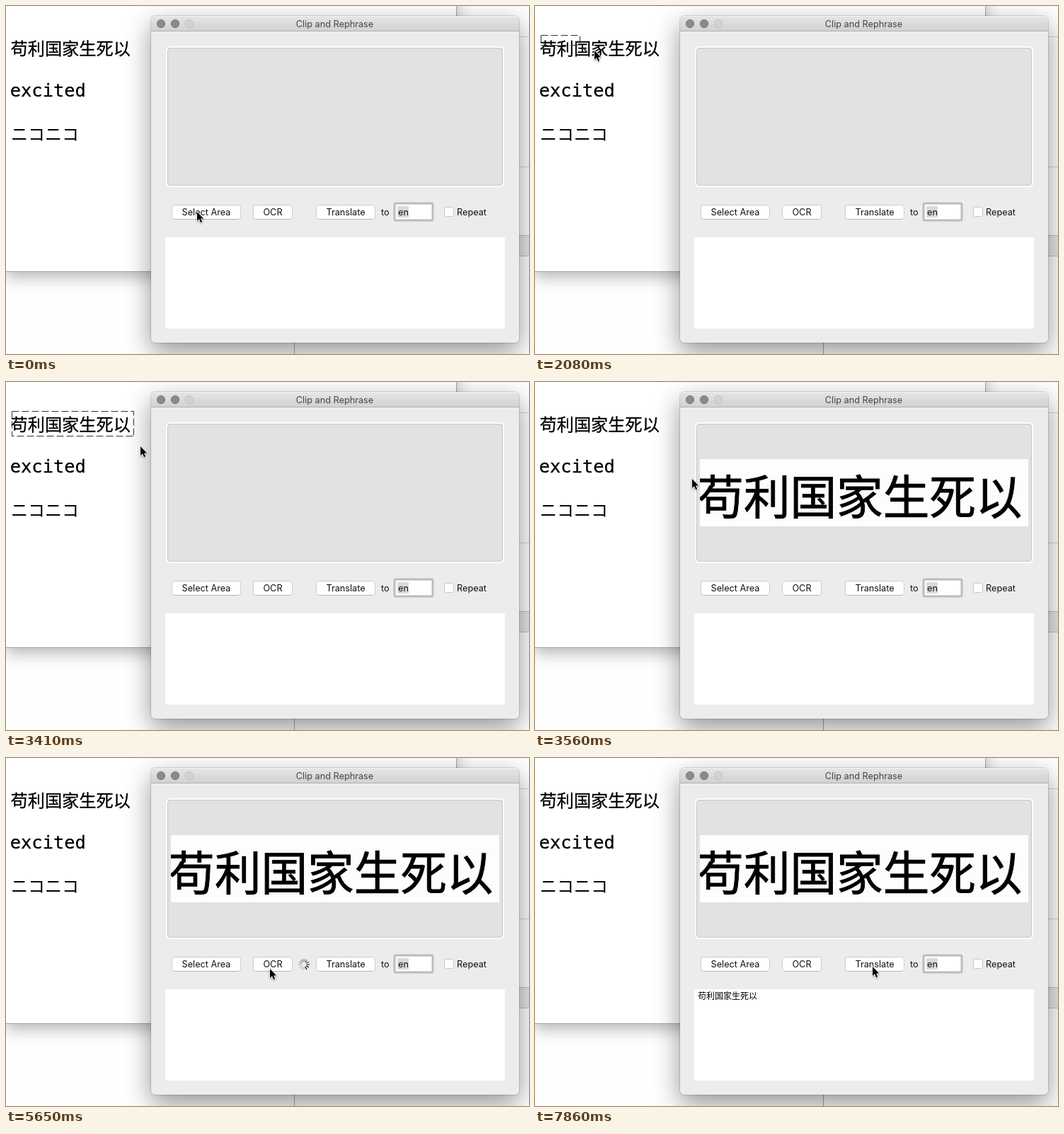
An HTML page that plays this animation: 739 by 492 pixels, repeating every 8000 ms.

```html
<!DOCTYPE html>
<html lang="en">
<head>
<meta charset="utf-8">
<title>Screen text demo</title>
<style>
  html, body { margin: 0; width: 100%; height: 100%; overflow: hidden; background: #fff; }
  #stage { position: relative; width: 739px; height: 492px; overflow: hidden; background: #fefefe; }
  #stage > * { position: absolute; box-sizing: border-box; }
  .rule { left: 637px; width: 102px; height: 1px; background: #d2d2d2; }
  #band { left: 637px; top: 324px; width: 102px; height: 30px; background: #e6e6e6;
    border: solid #bdbdbd; border-width: 1px 0; }
  #seam { left: 407px; top: 354px; width: 1px; height: 138px; background: #a6a6a6; }
  #notes { left: -1px; top: -20px; width: 638px; height: 396px; background: #fff;
    border: 1px solid #a2a2a2; box-shadow: 0 8px 20px rgba(0,0,0,.27); }
  #app { left: 205px; top: 14px; width: 520px; height: 462px; border-radius: 5px; background: #ececec;
    box-shadow: 0 0 0 .5px rgba(0,0,0,.28), 0 13px 36px rgba(0,0,0,.42); }
  #bar { left: 205px; top: 14px; width: 520px; height: 22px; border-radius: 5px 5px 0 0;
    background: linear-gradient(#e5e5e5, #d1d1d1); border-top: 1px solid #f2f2f2; border-bottom: 1px solid #b3b3b3; }
  svg { left: 0; top: 0; }
  text { font-family: Inter, Roboto, sans-serif; font-size: 12.7px; fill: #111; }
  .cjk { font-family: "Noto Sans CJK SC", "Noto Sans CJK JP", "Noto Sans CJK", sans-serif; fill: #000; }
  .mono { font: 25.4px "DejaVu Sans Mono", monospace; fill: #000; }
  .firm { stroke: #000; stroke-width: .3px; }
  .mid { text-anchor: middle; }
  .btn rect { fill: #fff; stroke: #cdcdcd; }
  .btn path { stroke: #b4b4b4; }
  .btn.down rect { fill: url(#press); stroke: #77777b; }
  .btn.down text { fill: #fff; }
</style>
</head>
<body>
<div id="stage">
  <div class="rule" style="top:43px"></div>
  <div class="rule" style="top:227px"></div>
  <div id="band"></div>
  <div id="seam"></div>
  <div id="notes"></div>
  <div id="app"></div>
  <div id="bar"></div>
  <svg width="739" height="492" viewBox="0 0 739 492">
    <defs>
      <linearGradient id="press" x2="0" y2="1">
        <stop stop-color="#a0a0a5"/><stop offset="1" stop-color="#737378"/>
      </linearGradient>
      <clipPath id="crop"><rect x="233" y="109" width="464" height="95"/></clipPath>
    </defs>

    <text class="cjk firm" x="6.5" y="69.4" style="font-size:24.2px">苟利国家生死以</text>
    <text class="mono firm" x="5.8" y="128.4">excited</text>
    <text class="cjk" x="7" y="189.5" style="font-size:24px">ニコニコ</text>

    <g id="lights"></g>
    <text class="mid" x="464.5" y="30" style="fill:#454545">Clip and Rephrase</text>

    <rect x="226" y="57" width="478" height="199" rx="5" fill="#fff"/>
    <rect x="228.5" y="59.5" width="473" height="194" rx="3.5" fill="#e2e2e2" stroke="#c6c6c6"/>
    <g id="shot" clip-path="url(#crop)">
      <rect x="233" y="109" width="464" height="95" fill="#fdfdfd"/>
      <text class="cjk" x="229.3" y="187.2" style="font-size:65.6px;stroke:#000;stroke-width:.9px">苟利国家生死以</text>
    </g>

    <g id="buttons"></g>
    <text x="530" y="296">to</text>
    <rect x="549" y="279" width="54" height="24" rx="2" fill="#fff" stroke="#bcbcbc" stroke-width="3"/>
    <rect x="553" y="283" width="16" height="16" fill="#dadada"/>
    <text x="554" y="296">en</text>
    <rect x="619.5" y="284.5" width="13" height="13" rx="2.5" fill="#fff" stroke="#c9c9c9"/>
    <text x="637" y="296">Repeat</text>
    <g id="spin" transform="translate(421 292)" stroke="#222" stroke-width="1.5" stroke-linecap="round"></g>

    <rect x="225" y="327" width="480" height="129" fill="#fff"/>
    <text id="result" class="cjk" x="230" y="340.6" style="font-size:12px">苟利国家生死以</text>

    <path id="box" fill="none" stroke="#333" stroke-dasharray="10 4"/>
    <path id="cursor" d="M0 0V13L3 10.2 5.1 15.2 7.2 14.3 5.1 9.5H9.2Z" stroke="#fff" stroke-width="1.6"
      paint-order="stroke" stroke-linejoin="round" style="filter:drop-shadow(0 1px 1px rgba(0,0,0,.35))"/>
  </svg>
</div>
<script>
const LOOP = 8000, TICKS = 54;
const $ = id => document.getElementById(id);

function add(parent, tag, attrs, label) {
  const el = document.createElementNS("http://www.w3.org/2000/svg", tag);
  for (const k in attrs) el.setAttribute(k, attrs[k]);
  if (label) el.textContent = label;
  parent.appendChild(el);
  return el;
}

function button(x, w, label) {
  const g = add($("buttons"), "g", { class: "btn" });
  add(g, "rect", { x: x + .5, y: 281.5, width: w - 1, height: 20, rx: 3.5 });
  add(g, "path", { d: `M${x + 4} 301.5h${w - 8}` });
  add(g, "text", { class: "mid", x: x + w / 2, y: 296 }, label);
  return g;
}

button(234, 98, "Select Area");
const ocr = button(349, 56, "OCR");
const translate = button(438, 84, "Translate");

for (let i = 0; i < 3; i++) {
  add($("lights"), "circle", {
    cx: 219 + 20 * i, cy: 25, r: 5.6,
    fill: i < 2 ? "#8b8b8b" : "#d3d3d3", stroke: i < 2 ? "#747474" : "#c0c0c0"
  });
}

const spokes = Array.from({ length: 12 }, (_, i) =>
  add($("spin"), "path", { d: "M0-4.2V-7.4", transform: `rotate(${i * 30})` }));

// Pointer legs: first tick, last tick, x and y on arrival
const home = [269, 290];
const legs = [
  [2, 9, 6, 40],
  [11, 17, 160, 83], [17, 18, 165, 77], [18, 21, 181, 77],
  [21, 23, 189, 90], [23, 24, 221, 136],
  [25, 27, 328, 244], [28, 29, 351, 288], [29, 32, 372, 297],
  [41, 44, 464, 294], [48, 50, 476, 294]
];
const GRAB = 11, DROP = 21, SHOT = 24, READ = 33, DONE = 41, SEND = 52;

const ease = p => p * p * (3 - 2 * p);

function pointer(k) {
  let [x, y] = home;
  for (const [a, b, tx, ty] of legs) {
    if (k <= a) break;
    const p = ease(Math.min(1, (k - a) / (b - a)));
    x += (tx - x) * p;
    y += (ty - y) * p;
  }
  return [x, y].map(Math.round);
}

const show = (el, on) => { el.style.display = on ? "" : "none"; };

function draw(t) {
  const k = Math.floor((t + 8) / LOOP * TICKS);
  const [x, y] = pointer(k);
  $("cursor").setAttribute("transform", `translate(${x + 1} ${y + 1})`);

  // The selection trails the pointer by half a tick until release
  const [r, b] = pointer(Math.min(k - .5, DROP));
  show($("box"), k > GRAB + 1 && k < SHOT);
  $("box").setAttribute("d", `M8.5 41.5H${r - .5}V${b - .5}M8.5 41.5V${b - .5}H${r - .5}`);

  show($("shot"), k >= SHOT);
  ocr.classList.toggle("down", k === READ);
  translate.classList.toggle("down", k === SEND);

  show($("spin"), k > READ && k < DONE);
  const head = 5 + 2 * (k - READ - 5);
  spokes.forEach((s, i) => {
    const age = (head - i + 240) % 12;
    s.setAttribute("stroke-opacity", Math.max(.2, 1 - age * .09));
  });
  show($("result"), k >= DONE);
}

const start = performance.now();
function tick() {
  draw((performance.now() - start) % LOOP);
  requestAnimationFrame(tick);
}
tick();
</script>
</body>
</html>
```
